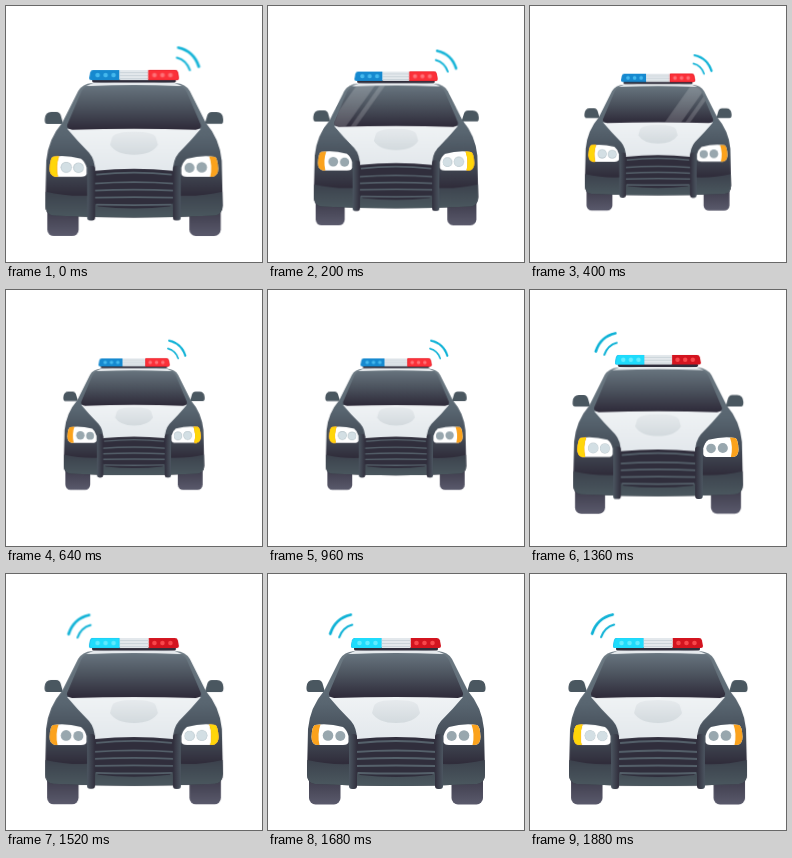
Write an HTML page without scripts that moves like this. It is 256 px wide and 256 px high and loops after 1920 ms.

```html
<!DOCTYPE html>
<html lang="en">
<head>
<meta charset="utf-8">
<title>Patrol car</title>
<style>
html, body { margin: 0; width: 100%; height: 100%; overflow: hidden; background: #fff; }
svg { display: block; width: 100vw; height: 100vh; }
.car, .wave, .right, .left, .glare { animation: 1920ms linear infinite; }
.car { transform-origin: 128px 85px; animation-name: drive; animation-delay: -45ms; }
.wave { fill: none; stroke: #0fb2d6; stroke-width: 2.8; stroke-linecap: round; animation-name: pulse; }
.right { animation-name: first; animation-timing-function: step-end; }
.left { animation-name: second; animation-timing-function: step-end; }
.glare { animation-name: sweep; }
.lit { animation: blink 480ms step-end -20ms infinite; animation-delay: -460ms; }
.lit.late { animation-delay: -260ms; }
@keyframes drive {
  0% { transform: scale(1); animation-timing-function: cubic-bezier(.36, 0, .64, 1); }
  31.25% { transform: scale(.789); }
  51.5% { transform: scale(.789); animation-timing-function: cubic-bezier(.36, 0, .64, 1); }
  83%, 100% { transform: scale(1); }
}
@keyframes first { 0% { opacity: 1; } 52.08%, 100% { opacity: 0; } }
@keyframes second { 0% { opacity: 0; } 52.08%, 100% { opacity: 1; } }
@keyframes blink { 0% { opacity: 0; } 70% { opacity: 1; } 100% { opacity: 1; } }
@keyframes pulse {
  0%, 15% { transform: none; }
  33% { transform: translate(1.3px, -1.3px); }
  50%, 71% { transform: none; }
  92%, 100% { transform: translate(.8px, -.8px); }
}
@keyframes sweep {
  0%, 3% { transform: translateX(-75px); }
  29%, 100% { transform: translateX(130px); }
}
</style>
</head>
<body>
<svg viewBox="0 0 256 256">
  <defs>
    <linearGradient id="body" x2="0" y2="1">
      <stop offset="0" stop-color="#6f7c85"/>
      <stop offset=".4" stop-color="#586570"/>
      <stop offset=".65" stop-color="#434b56"/>
      <stop offset=".83" stop-color="#302d3b"/>
    </linearGradient>
    <linearGradient id="bumper" x2="0" y2="1">
      <stop offset="0" stop-color="#3c424d"/>
      <stop offset="1" stop-color="#4b585f"/>
    </linearGradient>
    <linearGradient id="glass" x2="0" y2="1">
      <stop offset="0" stop-color="#68757f"/>
      <stop offset=".5" stop-color="#4b525d"/>
      <stop offset="1" stop-color="#2e2a39"/>
    </linearGradient>
    <linearGradient id="hood" x2="0" y2="1">
      <stop offset="0" stop-color="#f0f3f5"/>
      <stop offset="1" stop-color="#e3e8ec"/>
    </linearGradient>
    <linearGradient id="scoop" x2="0" y2="1">
      <stop offset="0" stop-color="#e6eaed"/>
      <stop offset="1" stop-color="#d3dade"/>
    </linearGradient>
    <linearGradient id="tire" x2="0" y2="1">
      <stop offset="0" stop-color="#2e2b39"/>
      <stop offset="1" stop-color="#5a5a6c"/>
    </linearGradient>
    <linearGradient id="bar">
      <stop offset="0" stop-color="#4c5661"/>
      <stop offset="1" stop-color="#302e3c"/>
    </linearGradient>
    <path id="pane" d="M84 80Q128 78 172 80Q178 80 181 86L195 119Q196 123 190 124Q128 122 66 124Q60 123 61 119L75 86Q78 80 84 80Z"/>
    <clipPath id="inside"><use href="#pane"/></clipPath>

    <g id="back">
      <rect x="41" y="190" width="31.500" height="40.500" rx="6.500" fill="url(#tire)"/>
      <path d="M38.500 113Q39 106 45 106H50Q54 106 55 111L57 118H41Q38 118 38.500 113Z" fill="#4a5760"/>
    </g>
    <g id="front">
      <path d="M47 151Q60 149 75 153Q79 156 80.500 162V168Q80 171 75 171H49Q43.500 170 43.500 163Q44 152 47 151Z" fill="#fff"/>
      <path id="signal" d="M47 151L52.500 150.500Q49 160 51.500 171H49Q43.500 170 43.500 163Q44 152 47 151Z" fill="#fba21c"/>
      <g fill="#98a7ae">
        <circle id="lamp" cx="60" cy="161.500" r="5.300"/>
        <circle cx="72.300" cy="162" r="5"/>
      </g>
      <rect x="81" y="160" width="8" height="55" rx="3" fill="url(#bar)"/>
    </g>
    <g id="beam">
      <use href="#signal"/>
      <path d="M47 151L52.500 150.500Q49 160 51.500 171H49Q43.500 170 43.500 163Q44 152 47 151Z" fill="#ffd60a"/>
      <g fill="#d3dfe4">
        <circle cx="60" cy="161.500" r="5.300"/>
        <circle cx="72.300" cy="162" r="5"/>
      </g>
    </g>
    <path id="side" d="M113.500 64H87Q84.500 64 84 66.500L83 72Q83 74 85 74H113.500Z"/>
    <g id="dots">
      <circle cx="91.500" cy="69" r="2.300"/><circle cx="99.500" cy="69" r="2.300"/><circle cx="107.500" cy="69" r="2.300"/>
    </g>
    <g id="arcs" class="wave">
      <path d="M172.500 41.500Q188 45 193 60.500"/>
      <path d="M171 51.500Q180.500 54 184 64" stroke-width="2.100"/>
    </g>
  </defs>

  <g class="car">
    <use href="#back"/>
    <use href="#back" transform="matrix(-1 0 0 1 256 0)"/>

    <path d="M86 77Q128 74 170 77Q180 78 184 85L200 117Q214 133 216 155L217 200Q217 209 209 210Q128 214 47 210Q39 209 39 200L40 155Q42 133 56 117L72 85Q76 78 86 77Z" fill="url(#body)"/>
    <path d="M39.300 186Q60 191 83 190H173Q196 191 216.700 186L217 200Q217 209 209 210Q128 214 47 210Q39 209 39 200Z" fill="url(#bumper)"/>
    <path d="M87 77Q128 74.500 169 77L176 80H80Z" fill="#e6eaed"/>
    <path d="M61 123Q128 120 195 123Q185 135 173 147Q167 154 167 166H89Q89 154 83 147Q71 135 61 123Z" fill="url(#hood)"/>
    <path d="M106 132Q108 126 128 126Q148 126 150 132L152 139Q146 149 128 149Q110 149 104 139Z" fill="url(#scoop)"/>

    <use href="#pane" fill="url(#glass)"/>
    <g clip-path="url(#inside)">
      <path class="glare" d="M102 78H122L88 126H68ZM127 78H133L99 126H93Z" fill="#fff" fill-opacity=".18"/>
    </g>

    <path d="M89 165Q128 161 167 165L172 179Q172 195 164 201Q128 205 92 201Q84 195 84 179Z" fill="#302e3c"/>
    <g fill="none" stroke="#55616b" stroke-width="1.800">
      <path d="M90 169Q128 165 166 169"/>
      <path d="M87 178Q128 175 169 178"/>
      <path d="M87 185Q128 183 169 185"/>
      <path d="M88 192Q128 191 168 192"/>
      <path d="M90 199Q128 200 166 199"/>
    </g>
    <use href="#front"/>
    <use href="#front" transform="matrix(-1 0 0 1 256 0)"/>
    <g class="lit"><use href="#beam"/></g>
    <g class="lit late"><use href="#beam" transform="matrix(-1 0 0 1 256 0)"/></g>

    <rect x="86" y="73" width="84" height="3.500" rx="1.500" fill="#302e3c"/>
    <use href="#side" fill="#1689cf"/>
    <use href="#side" fill="#d3141f" transform="matrix(-1 0 0 1 256 0)"/>
    <rect x="113.500" y="64" width="29" height="10" fill="#e3e8ec"/>
    <path d="M113.500 66.500H142.500M113.500 69.500H142.500M113.500 72.500H142.500" stroke="#cbd4da"/>
    <use href="#dots" fill="#45b9ee"/>
    <use href="#dots" fill="#f8484c" transform="matrix(-1 0 0 1 256 0)"/>

    <g class="right">
      <use href="#side" fill="#fb3039" transform="matrix(-1 0 0 1 256 0)"/>
      <use href="#dots" fill="#ff7379" transform="matrix(-1 0 0 1 256 0)"/>
      <use href="#arcs"/>
    </g>
    <g class="left">
      <use href="#side" fill="#1fdcfc"/>
      <use href="#dots" fill="#62ecff"/>
      <use href="#arcs" transform="matrix(-1 0 0 1 256 0)"/>
    </g>
  </g>
</svg>
</body>
</html>
```
